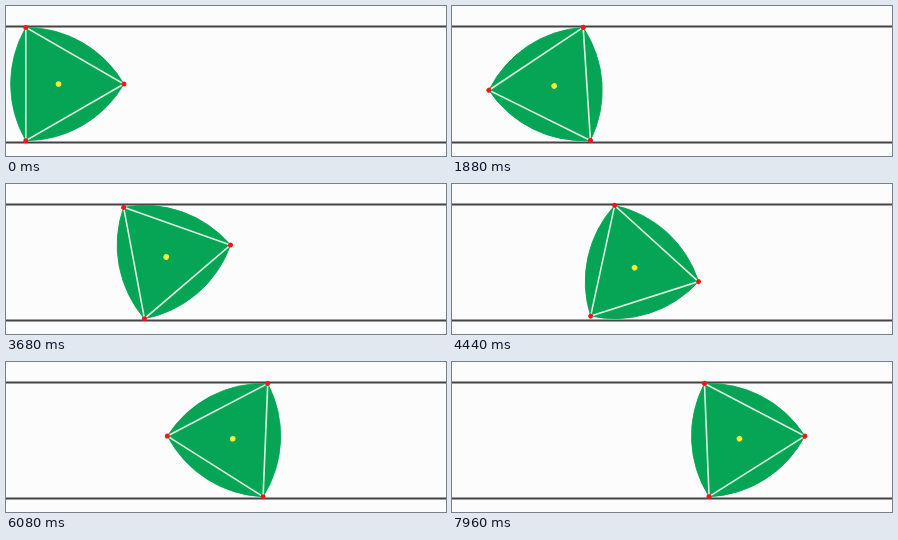
An HTML page that plays this animation: 440 by 150 pixels, repeating every 8 s.

```html
<!DOCTYPE html>
<html lang="en">
<head>
<meta charset="utf-8">
<title>Rolling Reuleaux triangle</title>
<style>
  html, body { margin: 0; width: 100%; height: 100%; overflow: hidden; background: #fcfcfc; }
  svg { display: block; width: 440px; height: 150px; }
</style>
</head>
<body>
<svg viewBox="0 0 440 150">
  <path d="M0 20.5H440M0 136.5H440" stroke="#444" stroke-width="2"/>
  <g id="roller">
    <path id="body" fill="#06a555" stroke="#06a555" stroke-width="0.8"/>
    <path id="edges" fill="none" stroke="#dcf3e2" stroke-width="1.6"/>
    <circle r="2.8" fill="#f6f03c"/>
    <g id="corners" fill="#f8141a"></g>
  </g>
</svg>
<script>
const WIDTH = 113.3, TOP = 21.4, BOTTOM = TOP + WIDTH, START_X = 19.8;
const RADIUS = WIDTH / Math.sqrt(3);
const LOOP = 8000, STEP = 40;
const ROLL_STEPS = 49, CYCLE_STEPS = 100;

const rad = deg => deg * Math.PI / 180;
const polar = deg => [RADIUS * Math.cos(rad(deg)), RADIUS * Math.sin(rad(deg))];
const $ = id => document.getElementById(id);

const [a, b, c] = [0, 120, 240].map(polar);
const arc = `A${WIDTH} ${WIDTH} 0 0 1 `;
$('body').setAttribute('d', `M${a}${arc}${b}${arc}${c}${arc}${a}Z`);
$('edges').setAttribute('d', `M${a}L${b}L${c}Z`);
$('corners').innerHTML = [a, b, c]
  .map(([x, y]) => `<circle cx="${x}" cy="${y}" r="2.5"/>`).join('');

function pose(step) {
  const cycle = Math.floor(step / CYCLE_STEPS);
  const s = step % CYCLE_STEPS;
  const arcLength = WIDTH * rad(60);
  const base = START_X + cycle * arcLength;
  // Roll on an arc centred at the top corner, then pivot on the bottom corner.
  const rolling = s < ROLL_STEPS;
  const angle = rolling
    ? 60 * s / ROLL_STEPS
    : 60 + 60 * (s - ROLL_STEPS) / (CYCLE_STEPS - ROLL_STEPS);
  const anchor = rolling
    ? [base + WIDTH * rad(angle), TOP]
    : [base + arcLength, BOTTOM];
  const [dx, dy] = polar(rolling ? angle + 240 : angle);
  return { x: anchor[0] - dx, y: anchor[1] - dy, angle: angle + 120 * cycle };
}

function render(time) {
  const step = Math.max(0, Math.floor(time % LOOP / STEP) - 1);
  const { x, y, angle } = pose(step);
  $('roller').setAttribute('transform', `translate(${x} ${y}) rotate(${angle})`);
}

const begin = performance.now();
function tick() {
  render(performance.now() - begin);
  requestAnimationFrame(tick);
}
tick();
</script>
</body>
</html>
```
